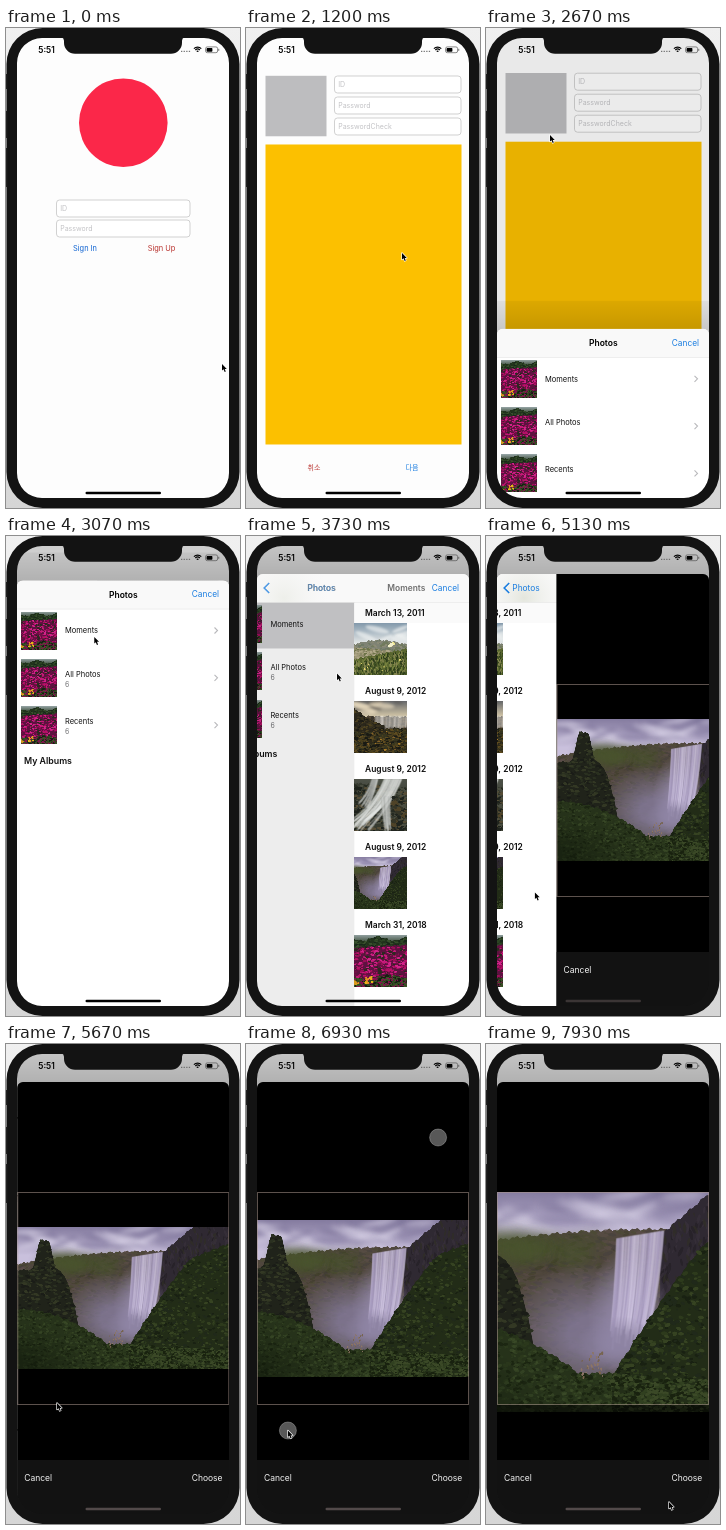
An HTML page with a canvas for the animation above (8 s loop, 234 by 480 pixels).

```html
<!DOCTYPE html>
<html lang="en">
<head>
<meta charset="utf-8">
<title>Sign up and pick a photo</title>
<style>
html, body { margin: 0; width: 100%; height: 100%; overflow: hidden; background: #e6e6e6; }
canvas { display: block; width: 234px; height: 480px; }
</style>
</head>
<body>
<canvas id="stage"></canvas>
<script>
const LOOP = 8000, W = 234, H = 480;
const SCREEN = { x: 11, y: 10, w: 212, h: 460 };
const BLUE = '#1a7de0', RED = '#b9332f', BEZEL = '#131313';
const stage = document.getElementById('stage');
const ratio = Math.max(1, window.devicePixelRatio || 1);
stage.width = W * ratio;
stage.height = H * ratio;
const c = stage.getContext('2d');

const clamp = v => Math.min(1, Math.max(0, v));
const mix = (a, b, p) => a + (b - a) * p;
const smooth = p => p * p * (3 - 2 * p);

// Critically damped spring, 0 to 1
function spring(t, start) {
  const x = Math.max(0, t - start) * 0.012;
  return 1 - (1 + x) * Math.exp(-x);
}

function rect(x, y, w, h, fill) {
  c.fillStyle = fill;
  c.fillRect(x, y, w, h);
}

function round(x, y, w, h, r, fill) {
  c.beginPath();
  c.roundRect(x, y, w, h, r);
  if (fill) {
    c.fillStyle = fill;
    c.fill();
  }
}

function stroke(color, width) {
  c.strokeStyle = color;
  c.lineWidth = width;
  c.stroke();
}

function text(str, x, y, size, color, align = 'left', weight = 400) {
  c.font = `${weight} ${size}px Inter, "Noto Sans CJK KR", "Noto Sans CJK", sans-serif`;
  c.textAlign = align;
  c.textBaseline = 'alphabetic';
  c.fillStyle = color;
  c.fillText(str, x, y + size * 0.36);
}

function chevron(x, y, dir, size, color, width) {
  c.beginPath();
  c.moveTo(x - dir * size / 2, y - size);
  c.lineTo(x + dir * size / 2, y);
  c.lineTo(x - dir * size / 2, y + size);
  stroke(color, width);
}

// ---- photos, painted once from hills, specks and water strands ----
function photo(w, h, seed, paint) {
  const pic = document.createElement('canvas');
  pic.width = w * 4;
  pic.height = h * 4;
  const g = pic.getContext('2d');
  g.scale(4, 4);
  const rnd = () => (seed = (seed * 16807) % 2147483647) / 2147483647;

  function sky(top, bottom, y1) {
    const grad = g.createLinearGradient(0, 0, 0, y1);
    grad.addColorStop(0, top);
    grad.addColorStop(1, bottom);
    g.fillStyle = grad;
    g.fillRect(0, 0, w, h);
  }
  // Ground below the curve edge(x), roughened, with specks of other colours
  function hill(edge, [base, ...tones], x0 = 0, x1 = w, rx = 1.4, ry = 0.7) {
    const top = x => edge(x) + Math.sin(x * 1.7) * 0.5 + Math.sin(x * 0.73) * 0.6;
    g.fillStyle = base;
    g.beginPath();
    g.moveTo(x0, h);
    for (let x = x0; x <= x1; x++) g.lineTo(x, top(x));
    g.lineTo(x1, h);
    g.fill();
    for (let i = 0; i < (x1 - x0) * 9; i++) {
      const x = mix(x0, x1, rnd());
      speck(x, mix(top(x) + ry, h, rnd()), rx, ry, tones);
    }
  }
  function speck(x, y, rx, ry, tones) {
    const k = 0.5 + rnd();
    g.fillStyle = tones[Math.floor(rnd() * tones.length)];
    g.beginPath();
    g.ellipse(x, y, rx * k, ry * k, rnd() - 0.5, 0, 7);
    g.fill();
  }
  function scatter(n, tones, x, y, sw, sh, rx, ry) {
    for (let i = 0; i < n; i++) speck(x + rnd() * sw, y + rnd() * sh, rx, ry, tones);
  }
  function glow(x, y, rx, ry, color) {
    g.save();
    g.translate(x, y);
    g.scale(rx, ry);
    const grad = g.createRadialGradient(0, 0, 0, 0, 0, 1);
    grad.addColorStop(0.25, color);
    grad.addColorStop(1, color.slice(0, 7) + '00');
    g.fillStyle = grad;
    g.fillRect(-1, -1, 2, 2);
    g.restore();
  }
  // Strands between a top line and a bottom line, each given as a function of u
  function water(n, from, to, tones) {
    for (let i = 0; i <= n; i++) {
      const [x0, y0] = from(i / n), [x1, y1] = to(i / n);
      g.beginPath();
      g.moveTo(x0, y0);
      g.quadraticCurveTo(mix(x0, x1, 0.3), mix(y0, y1, 0.5), x1, mix(y0, y1, 0.8 + rnd() * 0.25));
      g.strokeStyle = tones[Math.floor(rnd() * tones.length)];
      g.lineWidth = 0.8 + rnd() * 0.8;
      g.stroke();
    }
  }
  function soft(px, draw) {
    g.save();
    g.filter = `blur(${px * 4}px)`;
    draw();
    g.restore();
  }
  paint({ sky, hill, scatter, glow, water, soft });
  return pic;
}

const falls = photo(212, 142, 71, k => {
  const ridge = x => 24 + 13 * (1 - x / 140) ** 2;
  const cliff = x => 26 - Math.max(0, x - 145) * 0.85;
  const rock = x => 43 - 30 * Math.exp(-(((x - 27) / 9) ** 4)) + 60 * clamp((x - 40) / 22) ** 2;
  const slope = x => x > 175 ? 31 - (x - 175) * 0.4 : 31 + 86 * ((175 - x) / 62) ** 1.15;
  const bank = x => Math.min(117, 82 + 34 * (x / 89) ** 2);

  k.sky('#857ca0', '#c9c0dc', 28);
  k.soft(2.5, () => k.scatter(26, ['#ddd7ebaa', '#776e9588'], 0, 0, 190, 20, 16, 2));
  k.hill(ridge, ['#51483f', '#4c4b35aa', '#43402faa', '#5c4d4aaa', '#48403faa'], 0, 148, 2.2, 0.8);
  k.soft(5, () => k.scatter(26, ['#4c562f88'], 25, 31, 75, 13, 12, 3));
  k.hill(cliff, ['#2f2932', '#39313caa', '#241f26aa', '#302f25aa'], 143, 212, 0.8, 2.4);
  k.glow(98, 92, 58, 46, '#877d9ecc');
  k.glow(122, 78, 26, 42, '#9a8fb2cc');
  k.soft(0.45, () => k.water(46, u => [115 + 30 * u, 30 - 5 * u], u => [111 + 25 * u, 99],
    ['#c6bbd9bb', '#b3a7ccbb', '#d5cce7bb', '#a599bdbb']));
  k.glow(116, 98, 28, 18, '#8f85a5dd');
  k.hill(rock, ['#20231a', '#2a3020', '#1a1c17', '#333824'], 0, 62, 1.8, 0.9);
  k.hill(slope, ['#222c17', '#2d3a1c', '#192112', '#364322', '#20291a'], 113, 212, 1.5, 0.9);
  k.hill(bank, ['#26321a', '#33422260', '#19220fbb', '#40502b88', '#2b381c'], 0, 212 * 0.56, 1.3, 0.8);
  k.hill(x => 117 + (x - 113) * 0.06, ['#232e18', '#314020', '#19220f', '#3b4927'], 112, 212, 1.3, 0.8);
  k.scatter(26, ['#8d7565', '#77644f'], 92, 104, 14, 16, 0.5, 0.8);
  k.glow(0, 142, 70, 45, '#0f170a88');
});

const dunes = photo(52, 52, 13, k => {
  k.sky('#8299ab', '#e3e6e6', 20);
  k.soft(1.2, () => k.scatter(8, ['#eef0f0aa'], 12, 3, 40, 15, 9, 2));
  k.hill(x => 21 - 4 * Math.sin(x / 16), ['#7f8374', '#6f7a68', '#8d8c78', '#727b5d']);
  k.hill(x => 24 + x * 0.1, ['#8c8868', '#a19a79', '#6d7448', '#b0a889']);
  k.hill(x => 36 - x * 0.2, ['#59662f', '#75803e', '#3c4d22', '#858551', '#2e3d1b'], 0, 52, 0.5, 1.8);
  k.scatter(5, ['#efe58e', '#f4f0c8'], 35, 20, 4, 3, 1.7, 1.2);
  k.scatter(9, ['#e4d570'], 5, 35, 42, 12, 0.7, 0.6);
});

const golden = photo(52, 52, 29, k => {
  k.sky('#65676a', '#e6d7b2', 18);
  k.soft(1.5, () => k.scatter(12, ['#56514caa', '#f0e2c3aa'], 0, 0, 52, 13, 9, 2));
  k.hill(x => 15 + x * 0.02, ['#4a4136', '#39332b', '#5b4c37']);
  k.soft(0.6, () => k.water(30, u => [21 + 31 * u, 15], u => [21 + 30 * u, 28], ['#f2efe8cc', '#cbc8c3cc', '#aaa9a4cc']));
  k.hill(x => 7 + x * 0.9 - 0.011 * x * x, ['#2b271b', '#3b3420', '#1c1b15', '#4e421f'], 0, 30);
  k.hill(x => 29 + 2 * Math.sin(x / 9), ['#2d291a', '#4b401e', '#191a14', '#5f4c20', '#373620']);
  k.scatter(14, ['#a97b28', '#83612a'], 2, 30, 47, 19, 1, 0.6);
});

const stream = photo(52, 52, 43, k => {
  k.sky('#4e5248', '#24271f', 48);
  k.hill(x => 4 + 0.1 * x, ['#363a2f', '#272b22', '#4a4d40', '#1d211b', '#554c35'], 0, 52, 2, 1);
  k.soft(0.6, () => {
    k.water(26, u => [30 + 17 * u, 0], u => [-4 + 18 * u, 50], ['#e3e5e3cc', '#c9ccc9cc', '#a4a8a5cc']);
    k.water(9, u => [18 + 5 * u, 0], u => [4 + 9 * u, 28], ['#d8dad8cc', '#b2b5b2cc']);
    k.water(10, u => [27 + 8 * u, 18], u => [31 + 5 * u, 52], ['#d0d3d0cc', '#a9ada9cc']);
  });
  k.scatter(40, ['#20241e', '#353527', '#4f4328'], 38, 18, 14, 34, 2, 1.5);
});

const flowers = photo(52, 52, 97, k => {
  k.sky('#95a4a4', '#3b4c38', 8);
  k.hill(x => 4 + 2 * Math.sin(x / 5), ['#21331c', '#2c4424', '#18271a', '#38502c']);
  k.hill(x => 13 - x * 0.05, ['#5d1240', '#b81169', '#d4228a', '#9c0c59', '#701043', '#c51a78', '#2b2a1f'], 0, 52, 1.5, 0.8);
  k.hill(x => 42 + 2 * Math.sin(x / 7), ['#23321a', '#314a21', '#161e13', '#871050', '#3b5527']);
  k.scatter(12, ['#e9b51a', '#e8902a'], 11, 42, 8, 7, 1.2, 1);
  k.scatter(5, ['#d79b1b'], 0, 46, 5, 4, 1.2, 1);
});

// ---- pages ----
function field(x, y, w, label) {
  round(x, y, w, 17, 3, '#fff');
  stroke('#c6c6c6', 0.8);
  text(label, x + 3.7, y + 8.6, 7, '#c2c2c5');
}

function loginPage() {
  rect(0, 0, W, H, '#fdfdfd');
  c.fillStyle = '#fb2749';
  c.beginPath();
  c.arc(117.3, 94.8, 44.3, 0, 7);
  c.fill();
  field(50.5, 172, 133.5, 'ID');
  field(50.5, 192, 133.5, 'Password');
  text('Sign In', 79, 220, 7.4, '#1265d2', 'center');
  text('Sign Up', 155.5, 220, 7.4, RED, 'center');
}

function signUpPage(y) {
  c.save();
  c.translate(0, y);
  rect(0, 10, W, H, '#fdfdfd');
  rect(19.5, 45, 61, 60.5, '#bdbdbf');
  ['ID', 'Password', 'PasswordCheck'].forEach((label, i) => field(88.5, 45.2 + i * 21, 126.5, label));
  rect(19.5, 113.7, 196, 300, '#fcc000');
  text('취소', 68, 436.3, 7, RED, 'center');
  text('다음', 166, 436.3, 7, BLUE, 'center');
  c.restore();
}

function albumPage(t, x, dim) {
  c.save();
  c.translate(x, 0);
  rect(11, 38, 212, 440, '#fff');
  if (t > 3530) rect(11, 66, 212, 46.5, '#cfcfd1');
  ['Moments', 'All Photos', 'Recents'].forEach((name, i) => {
    const y = 88 + i * 47.3;
    c.drawImage(flowers, 15, y - 19, 36, 38);
    text(name, 59, i ? y - 3.8 : y, 7.5, '#111');
    if (i && t > 3000) text('6', 59, y + 6.6, 7, '#77777a');
    chevron(210, y, 1, 3, '#b9b9bc', 1.1);
  });
  text('My Albums', 18, 218, 8.8, '#111', 'left', 600);
  c.restore();
  rect(11, 38, 212, 440, `rgba(0,0,0,${dim})`);
}

function momentsPage(x) {
  c.save();
  c.translate(x, 0);
  rect(11, 38, 212, 440, '#fff');
  rect(11, 67, 212, 20, '#fafafa');
  const days = ['March 13, 2011', 'August 9, 2012', 'August 9, 2012', 'August 9, 2012', 'March 31, 2018'];
  [dunes, golden, stream, falls, flowers].forEach((pic, i) => {
    const y = 87 + i * 77.9, crop = pic.height;
    text(days[i], 21.7, y - 9.6, 8.45, '#0c0c0c', 'left', 600);
    c.drawImage(pic, (pic.width - crop) * 0.65, 0, crop, crop, 11, y, 52.3, 52.3);
  });
  c.restore();
}

function navBar(p) {
  rect(11, 38, 212, 28.5, '#f9f9f9');
  const tint = c.createRadialGradient(38, 62, 0, 38, 62, 45);
  tint.addColorStop(0, `rgba(196,202,180,${0.4 * p})`);
  tint.addColorStop(1, 'rgba(235,235,230,0)');
  rect(11, 38, 212, 28.5, tint);
  rect(11, 66.3, 212, 0.5, '#dededf');
  const x = mix(117.3, 40, p);
  c.globalAlpha = 1 - smooth(p);
  text('Photos', x, 52, 8.5, '#000', 'center', 600);
  c.globalAlpha = smooth(p);
  text('Photos', x, 52, 8.4, BLUE, 'center');
  text('Moments', mix(211, 117.3, p), 52, 8.4, '#000', 'center', 600);
  c.globalAlpha = clamp(p * 1.4);
  chevron(20.7, 52, -1, 5, BLUE, 1.6);
  c.globalAlpha = 1;
  text('Cancel', 213, 52, 8.3, BLUE, 'right');
}

function cropPage(t, x) {
  const p = smooth(clamp((t - 6730) / 730));
  const w = 212 * mix(1, 1.55, p), h = 142 * mix(1, 1.55, p);
  c.save();
  c.translate(x, 0);
  rect(11, 38, 212, 440, '#000');
  c.drawImage(falls, 117 - w / 2, mix(254, 258, p) - h / 2, w, h);
  rect(11, 38, 212, 110, 'rgba(0,0,0,.55)');
  rect(11, 361, 212, 55, 'rgba(0,0,0,.55)');
  c.strokeStyle = 'rgba(170,150,140,.55)';
  c.lineWidth = 1;
  c.strokeRect(11.5, 148.5, 211, 212);
  rect(11, 416, 212, 60, '#121212');
  text('Cancel', 18, 434.3, 8.5, '#f2f2f2');
  text('Choose', 216.3, 434.3, 8.5, '#f2f2f2', 'right');
  c.restore();
}

function photoSheet(t, y, shown) {
  const shade = c.createLinearGradient(0, y + 10, 0, y + 38);
  shade.addColorStop(0, 'rgba(0,0,0,.05)');
  shade.addColorStop(1, 'rgba(0,0,0,.14)');
  rect(0, 0, W, H, `rgba(0,0,0,${0.19 * shown})`);
  rect(0, y + 10, W, 34, shade);
  const push = spring(t, 3580), edit = spring(t, 4920);
  c.save();
  c.translate(0, y);
  round(11, 38, 212, 460, 6);
  c.clip();
  albumPage(t, -64 * push, 0.13 * push);
  if (push > 0) momentsPage(212 * (1 - push) - 64 * edit);
  navBar(push);
  if (edit > 0) cropPage(t, 212 * (1 - edit));
  c.restore();
  return edit;
}

// ---- device ----
function statusBar() {
  text('5:51', 40.5, 21.8, 8.4, '#000', 'center', 600);
  for (let i = 0; i < 4; i++) rect(175 + i * 2.6, 22.8, 1.3, 1.1, '#666');
  for (let r = 1.2; r < 6; r += 2) {
    c.beginPath();
    c.arc(191.6, 24.3, r, -Math.PI * 0.75, -Math.PI * 0.25);
    stroke('#000', 1.25);
  }
  round(199.6, 18.9, 12, 5.8, 1.7);
  stroke('#555', 0.7);
  round(200.6, 19.9, 5.8, 3.8, 0.8, '#000');
  rect(212.4, 20.8, 0.8, 2, '#555');
}

function bezel() {
  const left = 58, right = W - left, top = SCREEN.y, bottom = 25.7;
  c.fillStyle = BEZEL;
  c.beginPath();
  c.roundRect(0.5, 0, 233, 480, 36);
  c.roundRect(SCREEN.x, SCREEN.y, SCREEN.w, SCREEN.h, 25);
  c.fill('evenodd');
  for (let i = 0; i < 3; i++) rect(0, 46 + 37 * i, 1.3, 15 + 12 * i, '#222');
  c.beginPath();
  c.moveTo(left - 4, top - 1);
  c.arcTo(left, top, left, bottom, 3.5);
  c.arcTo(left, bottom, right, bottom, 11);
  c.arcTo(right, bottom, right, top, 11);
  c.arcTo(right, top, right + 4, top - 1, 3.5);
  c.lineTo(right + 4, top - 1);
  c.fillStyle = BEZEL;
  c.fill();
}

// Where the pointer goes, when it arrives and how long it takes
const GLIDES = [
  { to: [156, 225], at: 620, take: 420 },
  { to: [64, 107], at: 2000, take: 770 },
  { to: [100, 98], at: 3300, take: 600 },
  { to: [43, 349], at: 4330, take: 800 },
  { to: [51, 359], at: 5500, take: 1100 },
  { to: [51, 367], at: 6070, take: 400 },
  { to: [2, 472], at: 7460, take: 730 },
  { to: [183, 458], at: 7930, take: 280 }
];

function pointer(t) {
  return GLIDES.reduce(([x, y], { to, at, take }) => {
    const p = smooth(clamp((t - at + take) / take));
    return [mix(x, to[0], p), mix(y, to[1], p)];
  }, [216, 336]);
}

function touch(x, y) {
  c.beginPath();
  c.arc(x, y, 8.5, 0, 7);
  c.fillStyle = 'rgba(160,160,160,.55)';
  c.fill();
  stroke('rgba(205,205,205,.5)', 0.7);
}

const ARROW = new Path2D('M0 0V6.6L1.5 5.3 2.7 8 3.8 7.5 2.7 4.9H4.8Z');

function cursor(t) {
  const [x, y] = pointer(t);
  if (t > 6380 && t < 7520) {
    touch(x, y);
    touch(W - x, H - y);
  }
  c.save();
  c.translate(x, y);
  c.lineJoin = 'round';
  c.strokeStyle = '#fff';
  c.lineWidth = 1.3;
  c.stroke(ARROW);
  c.fillStyle = '#000';
  c.fill(ARROW);
  c.restore();
}

function render(t) {
  c.setTransform(ratio, 0, 0, ratio, 0, 0);
  const back = c.createLinearGradient(0, 0, 0, H);
  back.addColorStop(0, '#f0f0f0');
  back.addColorStop(1, '#d6d6d6');
  rect(0, 0, W, H, back);

  c.save();
  round(SCREEN.x - 0.5, SCREEN.y - 0.5, SCREEN.w + 1, SCREEN.h + 1, 25);
  c.clip();
  loginPage();
  const signUp = spring(t, 600);
  if (signUp > 0) signUpPage(SCREEN.h * (1 - signUp));
  const shown = spring(t, 2555);
  const edit = shown > 0 ? photoSheet(t, 442 * (1 - shown), shown) : 0;
  statusBar();
  round(79.5, 463.8, 75.5, 2.5, 1.3, `rgb(${82 * edit},${74 * edit},${74 * edit})`);
  c.restore();

  bezel();
  cursor(t);
}

function tick() {
  render(performance.now() % LOOP);
  requestAnimationFrame(tick);
}
tick();
</script>
</body>
</html>
```
